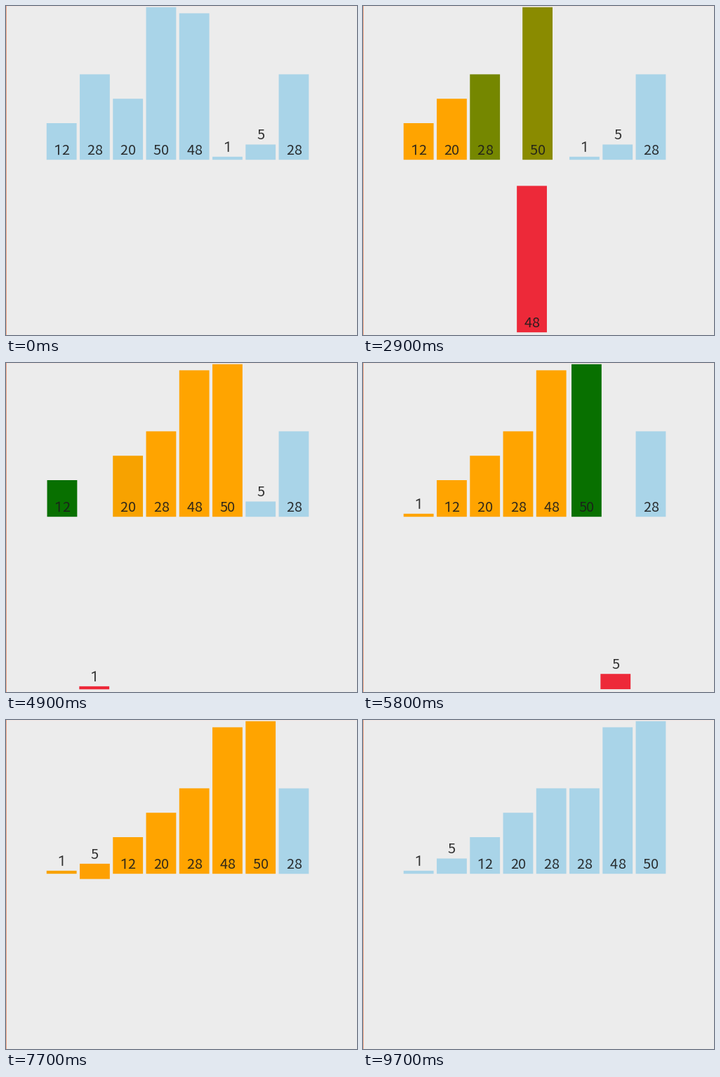
Animation, 500 px wide and 469 px high, one loop 9.8 s. Source, as a matplotlib script:

```python
import numpy as np
import matplotlib.pyplot as plt
from matplotlib.animation import FuncAnimation
from matplotlib.patches import Polygon, Rectangle

W, H, DPI = 500, 469, 100
FRAMES, STEP = 98, 100
VALUES = [12, 28, 20, 50, 48, 1, 5, 28]

LEFT, PITCH, BAR_W = 57.8, 47.25, 42.8
BASE, DROP, UNIT = 219.2, 246, 4.35
FADE = 220  # length of one transition in ms

BLUE = (169, 212, 232)
ORANGE = (255, 164, 0)
GREEN = (0, 110, 0)
RED = (237, 41, 57)
INK = "#1c1c1c"

# Start times of the sorting steps; steps between are evenly spaced
STEP_KEYS = [1, 8, 14, 15, 16, 23, 33, 44, 51]
STEP_TIMES = [246, 1436, 2480, 2723, 2787, 3985, 5745, 7690, 8910]


def sort_steps(values):
    """Insertion sort as a list of (slot, lowered, colour) per bar."""
    n = len(values)
    slot = list(range(n))
    low = [0] * n
    colour = [BLUE] * n
    order = list(range(n))
    steps = []

    def push():
        steps.append(np.array(
            [(slot[b], low[b], *colour[b]) for b in range(n)], float))

    push()
    colour[0] = ORANGE
    push()
    for i in range(1, n):
        key = order[i]
        low[key], colour[key] = 1, RED
        push()
        j = i - 1
        while j >= 0:
            other = order[j]
            colour[other] = GREEN
            push()
            if values[other] <= values[key]:
                break
            order[j], order[j + 1] = key, other
            slot[key], slot[other] = j, j + 1
            push()
            colour[other] = ORANGE
            j -= 1
        if j < 0:
            push()
        else:
            colour[order[j]] = ORANGE
        low[key], colour[key] = 0, ORANGE
        push()
    colour[:] = [BLUE] * n
    push()
    return steps


def ease(u):
    u = min(max(u, 0), 1)
    return 4 * u ** 3 if u < 0.5 else 1 - 4 * (1 - u) ** 3


goals = sort_steps(VALUES)
times = np.interp(np.arange(len(goals)), STEP_KEYS, STEP_TIMES)
times[0] = 0

# A new step takes over from wherever the last one had got to
starts = [goals[0]]
for k in range(1, len(goals)):
    done = ease((times[k] - times[k - 1]) / FADE)
    starts.append(starts[-1] + (goals[k - 1] - starts[-1]) * done)


def pose(t):
    k = np.searchsorted(times, t, side="right") - 1
    return starts[k] + (goals[k] - starts[k]) * ease((t - times[k]) / FADE)


fig = plt.figure(figsize=(W / DPI, H / DPI), dpi=DPI, facecolor="#ececec")
ax = fig.add_axes([0, 0, 1, 1])
ax.set_xlim(0, W)
ax.set_ylim(H, 0)
ax.axis("off")
ax.add_patch(Rectangle((0, 0), W, 1, color="#f1e6e4", lw=0))
ax.add_patch(Rectangle((0, 0), 1, H, color="#e9a286", lw=0))

# Plain figure one without a foot
ONE = np.array([(0.3, 0), (2.1, 0), (2.1, -14.6), (1.3, -14.6),
                (-3.5, -12.4), (-3.5, -10.7), (0.3, -12.4)])
ADVANCE = 11


class Bar:
    def __init__(self, value):
        self.height = value * UNIT
        self.rect = ax.add_patch(
            Rectangle((0, 0), BAR_W, self.height, lw=0, snap=False))
        text = str(value)
        self.digits = []
        for i, char in enumerate(text):
            offset = (i - (len(text) - 1) / 2) * ADVANCE
            if char == "1":
                glyph = ax.add_patch(
                    Polygon(ONE, fc=INK, lw=0, alpha=0.9, zorder=3))
            else:
                glyph = ax.text(0, 0, char, family="Noto Sans CJK JP",
                                size=20 * 72 / DPI, color=INK, alpha=0.9,
                                ha="center", va="baseline", zorder=3)
            self.digits.append((glyph, offset))

    def place(self, slot, low, *rgb):
        x = LEFT + slot * PITCH
        bottom = BASE + low * DROP
        self.rect.set_xy((x, bottom - self.height))
        self.rect.set_facecolor(np.clip(np.array(rgb) / 255, 0, 1))
        # Labels of short bars sit above them
        line = bottom - 7 - (self.height if self.height < 30 else 0)
        for glyph, offset in self.digits:
            centre = x + BAR_W / 2 + offset
            if isinstance(glyph, Polygon):
                glyph.set_xy(ONE + (centre, line))
            else:
                glyph.set_position((centre, line))


bars = [Bar(v) for v in VALUES]


def draw(frame):
    for bar, state in zip(bars, pose(frame * STEP)):
        bar.place(*state)
    return []


anim = FuncAnimation(fig, draw, frames=FRAMES, interval=STEP,
                     repeat=True, repeat_delay=0, blit=False)
plt.show()
```
